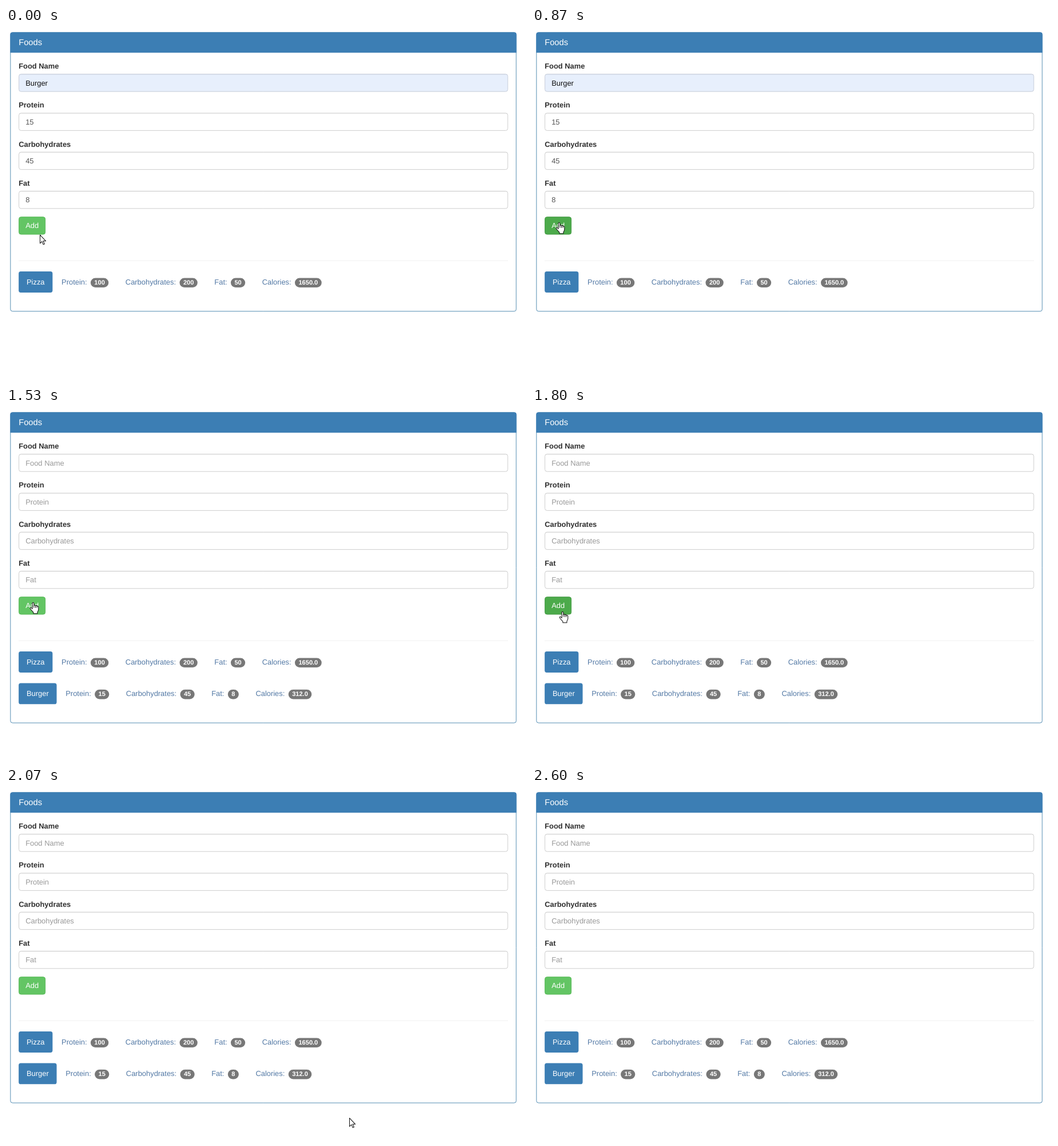
These frames come from a looping animation (909 px wide and 616 px high, 2.74 s). An HTML page with a canvas:

```html
<!DOCTYPE html>
<html lang="en">
<head>
<meta charset="utf-8">
<title>Foods</title>
<style>
  html, body { margin: 0; width: 100%; height: 100%; overflow: hidden; background: #fff; }
  canvas { display: block; width: 100vw; height: 100vh; }
</style>
</head>
<body>
<canvas id="stage" width="909" height="616"></canvas>
<script>
const ctx = document.getElementById('stage').getContext('2d');
const LOOP = 2740;
const ZOOM = 0.9223;          // page units to stage pixels
const LEFT = 24, RIGHT = 951.5;
const FONT = '"Liberation Sans", Arial, sans-serif';
const BLUE = '#3c7eb4', GREEN = '#63c564', DARK_GREEN = '#4caa4b';

const FIELDS = [['Food Name', 'Burger'], ['Protein', '15'], ['Carbohydrates', '45'], ['Fat', '8']];
const PIZZA = ['Pizza', '100', '200', '50', '1650.0'];
const BURGER = ['Burger', '15', '45', '8', '312.0'];
const CAPTIONS = ['Protein: ', 'Carbohydrates: ', 'Fat: ', 'Calories: '];

// Pointer: time, shape, hot spot in stage pixels
const POINTER = [
  [0, 'arrow', 59.5, 362],
  [70, 'hand', 56, 356],
  [200, 'hand', 50, 347],
  [270, 'hand', 47, 341],
  [600, 'hand', 47, 340],
  [1470, 'arrow', 46.7, 340],
  [1530, 'hand', 47, 340],
  [1670, 'hand', 48, 343],
  [1730, 'hand', 50, 349],
  [1800, 'hand', 53, 356],
  [1870, 'arrow', 78, 372],
  [1930, 'arrow', 215, 435],
  [2000, 'arrow', 425, 515],
  [2070, 'arrow', 600.5, 577.5],
  [2130, 'arrow', 690, 598],
  [2200, 'arrow', 728, 605],
  [2270, 'none', 0, 0]
];

const ARROW = new Path2D('M.5 .5V16.3L4.1 12.9L6.6 18.6L9 17.6L6.5 12H11.5Z');
const HAND = new Path2D('M5 2Q6.5-.5 8 2V6.2Q9.6 4.8 10.9 6.6Q12.6 5.6 13.7 7.6' +
  'Q15.8 6.8 16.6 9.2V14Q16.2 17 14.6 18.8V21.6H7V19.4Q4 16.4 1.2 12.8Q0 10.2 2.6 10.4L5 12.6Z');
const KNUCKLES = new Path2D('M8 6V10.5M10.9 6.6V10.8M13.7 7.6V11');

function box(x, y, w, h, r, fill, line) {
  const inset = line ? 0.5 : 0;
  ctx.beginPath();
  ctx.roundRect(x + inset, y + inset, w - 2 * inset, h - 2 * inset, r);
  if (fill) { ctx.fillStyle = fill; ctx.fill(); }
  if (line) { ctx.strokeStyle = line; ctx.lineWidth = 1; ctx.stroke(); }
}

// Draws text on its baseline and returns the advance width
function text(str, x, y, color, size = 14, weight = 'normal') {
  ctx.font = `${weight} ${size}px ${FONT}`;
  ctx.fillStyle = color;
  ctx.fillText(str, x, y);
  return ctx.measureText(str).width;
}

function textWidth(str, size = 14, weight = 'normal') {
  ctx.font = `${weight} ${size}px ${FONT}`;
  return ctx.measureText(str).width;
}

function panel(bottom) {
  box(8, 8, RIGHT + 8, bottom - 8, 4, '#fff', '#4785ad');
  box(8, 8, RIGHT + 8, 39, [4, 4, 0, 0], BLUE);
  text('Foods', LEFT, 33, '#fff', 16);
}

function field([label, value], i, filled) {
  const top = 62 + i * 74;
  const auto = filled && i === 0;
  text(label, LEFT, top + 15, '#303030', 14, 'bold');
  box(LEFT, top + 25, RIGHT - LEFT, 34, 4, auto ? '#e7effc' : '#fff', auto ? '#c3c9d6' : '#c9c9c9');
  ctx.fillStyle = 'rgba(0,0,0,.05)';
  ctx.fillRect(LEFT + 2, top + 26, RIGHT - LEFT - 4, 1);
  const color = auto ? '#111' : filled ? '#555' : '#999';
  text(filled ? value : label, LEFT + 13, top + 47, color);
}

function addButton(hover, focus) {
  const w = textWidth('Add') + 26;
  box(LEFT, 358, w, 34, 4, hover ? DARK_GREEN : GREEN, hover ? '#3f963f' : '#52b652');
  if (focus) box(LEFT - 0.5, 357.5, w + 1, 35, 2, null, '#5f9fd0');
  text('Add', LEFT + 13, 380, '#fff');
}

function foodRow([name, ...values], top) {
  const base = top + 25;
  const w = textWidth(name) + 30;
  box(LEFT, top, w, 40, 4, BLUE);
  text(name, LEFT + 15, base, '#fff');
  let x = LEFT + w + 17;
  values.forEach((value, i) => {
    x += text(CAPTIONS[i], x, base, '#5379a5') + 3;
    const badge = textWidth(value, 12, 'bold') + 14;
    box(x, top + 12.3, badge, 18, 9, '#777');
    text(value, x + 7, base, '#fff', 12, 'bold');
    x += badge + 32;
  });
}

function pointer([, shape, x, y]) {
  if (shape === 'none') return;
  const hand = shape === 'hand';
  const path = hand ? HAND : ARROW;
  ctx.save();
  ctx.translate(x / ZOOM - (hand ? 6 : 0.5), y / ZOOM - 0.3);
  ctx.fillStyle = '#fff';
  ctx.strokeStyle = '#111';
  ctx.lineWidth = 1.1;
  ctx.lineJoin = 'round';
  ctx.fill(path);
  ctx.stroke(path);
  if (hand) ctx.stroke(KNUCKLES);
  ctx.restore();
}

function draw(t) {
  const added = t >= 1530;
  const hover = (t >= 70 && t < 1530) || (t >= 1600 && t < 1870);
  ctx.setTransform(1, 0, 0, 1, 0, 0);
  ctx.fillStyle = '#fff';
  ctx.fillRect(0, 0, 909, 616);
  ctx.scale(ZOOM, ZOOM);
  ctx.textRendering = 'geometricPrecision';

  panel(added ? 598 : 538);
  FIELDS.forEach((f, i) => field(f, i, !added));
  addButton(hover, t >= 1470 && !added);
  ctx.fillStyle = '#eee';
  ctx.fillRect(LEFT, 441, RIGHT - LEFT, 1);
  foodRow(PIZZA, 462);
  if (added) foodRow(BURGER, 522);
  pointer(POINTER.findLast(p => p[0] <= t));
}

const start = performance.now();
function tick() {
  draw((performance.now() - start) % LOOP);
  requestAnimationFrame(tick);
}
tick();
</script>
</body>
</html>
```
